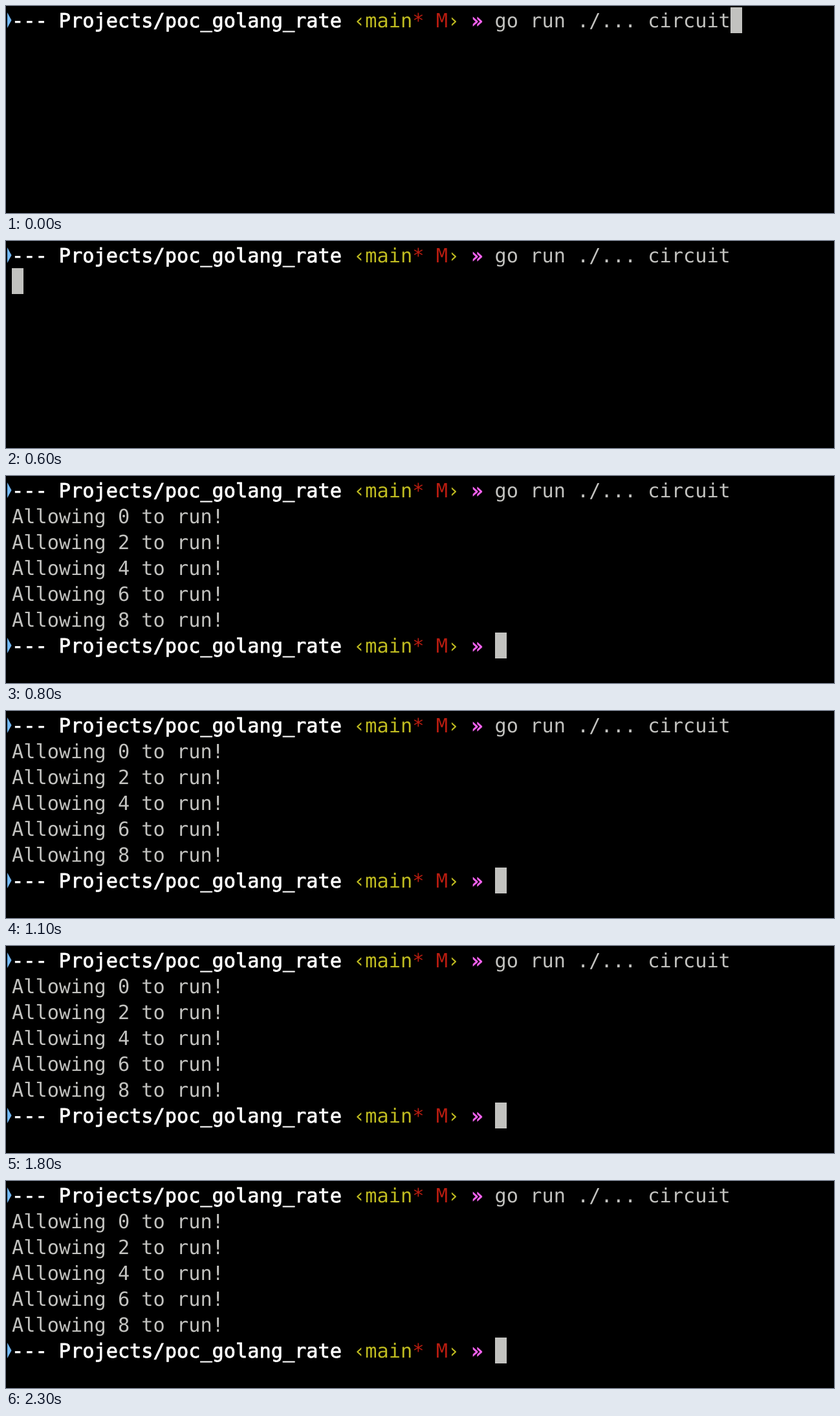
An HTML page for the animation above (2400 ms loop, 1280 by 320 pixels).

```html
<!DOCTYPE html>
<html lang="en">
<head>
<meta charset="utf-8">
<title>Terminal</title>
<style>
  html, body {
    margin: 0;
    width: 100%;
    height: 100%;
    overflow: hidden;
    background: #000;
  }
  svg { display: block; width: 1280px; height: 320px; }
  text {
    font: 30.25px "DejaVu Sans Mono", "Liberation Mono", monospace;
    fill: #c2c2bf;
    white-space: pre;
    text-rendering: geometricPrecision;
  }
  .bold { fill: #fff; stroke: #fff; stroke-width: .8px; }
  .branch { fill: #bfbb20; }
  .dirty { fill: #b81c10; }
  .mark { fill: #f562f0; stroke: #f562f0; stroke-width: .8px; }
  .arrow { fill: #72b8f8; }
  .cursor { fill: #c2c2bf; }

  /* Everything changes in hard steps over one 2400 ms loop. */
  .cursor, .output, .next { animation: 2400ms step-end infinite; }
  .cursor { animation-name: jump; }
  .output { animation-name: print; }
  .next { animation-name: ready; }
  @keyframes jump {
    0% { transform: translate(1120px, 2px); }
    12.5% { transform: translate(9px, 42px); }
    29.16% { transform: translate(9px, 242px); }
    33.33%, 100% { transform: translate(756px, 242px); }
  }
  @keyframes print {
    0% { visibility: hidden; }
    29.16%, 100% { visibility: visible; }
  }
  @keyframes ready {
    0% { visibility: hidden; }
    33.33%, 100% { visibility: visible; }
  }
</style>
</head>
<body>
<svg viewBox="0 0 1280 320">
  <defs>
    <path id="arrow" class="arrow" d="M2 10 L8.5 22 L2 34Z"/>
    <text id="prompt" x="9" y="33"><tspan class="bold">--- Projects/poc_golang_rate</tspan> <tspan class="branch">‹main</tspan><tspan class="dirty">* M</tspan><tspan class="branch">›</tspan> <tspan class="mark">»</tspan></text>
  </defs>

  <use href="#arrow"/>
  <use href="#prompt"/>
  <text x="755.6" y="33">go run ./... circuit</text>

  <g class="output">
    <text x="9" y="73">Allowing 0 to run!</text>
    <text x="9" y="113">Allowing 2 to run!</text>
    <text x="9" y="153">Allowing 4 to run!</text>
    <text x="9" y="193">Allowing 6 to run!</text>
    <text x="9" y="233">Allowing 8 to run!</text>
    <use href="#arrow" y="240"/>
  </g>
  <g class="next"><use href="#prompt" y="240"/></g>

  <rect class="cursor" width="18" height="40"/>
</svg>
</body>
</html>
```
